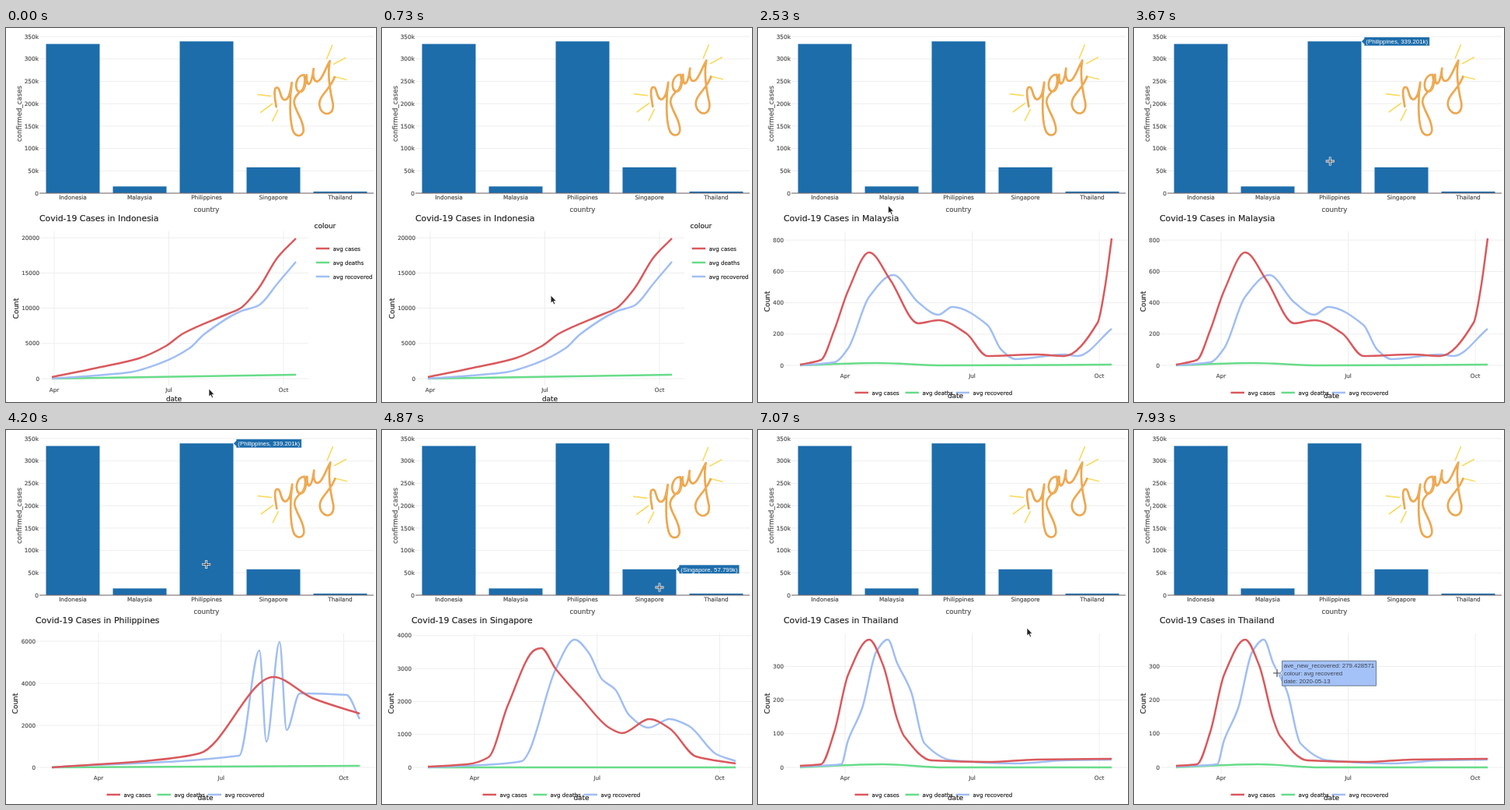
An HTML page that plays this animation: 476x480 px, repeating every 8000 ms.

```html
<!DOCTYPE html>
<html lang="en">
<head>
<meta charset="utf-8">
<title>Covid-19 dashboard</title>
<style>
  html, body { margin: 0; width: 100%; height: 100%; overflow: hidden; background: #fff; }
  svg { display: block; width: 100vw; height: 100vh; }
  text { font-family: "DejaVu Sans", sans-serif; stroke-width: .18px; white-space: pre; }
  .tip text { font-family: "Liberation Sans", Arial, sans-serif; stroke: none; }
  .grid { stroke: #eee; stroke-width: 1; }
  .line { fill: none; stroke-width: 2.5; stroke-linejoin: round; }
</style>
</head>
<body>
<svg id="stage" viewBox="0 0 476 480"></svg>
<script>
const LOOP = 8000;
const BLUE = '#1d6dab', GREY = '#4d4d4d', INK = '#222';
const COLORS = { cases: '#d9595d', deaths: '#68dc89', recovered: '#a1bef3' };
const stage = document.getElementById('stage');

function add(parent, tag, attrs = {}, text) {
  const node = document.createElementNS('http://www.w3.org/2000/svg', tag);
  for (const key in attrs) node.setAttribute(key, attrs[key]);
  if (text !== undefined) node.textContent = text;
  parent.appendChild(node);
  return node;
}
const label = (parent, text, x, y, size, anchor = 'start', fill = GREY) =>
  add(parent, 'text', { x, y, 'font-size': size, 'text-anchor': anchor, fill, stroke: fill }, text);
const upright = (parent, text, x, y, size, fill) =>
  label(parent, text, 0, 0, size, 'middle', fill).setAttribute('transform', `translate(${x} ${y}) rotate(-90)`);
const rule = (parent, x1, y1, x2, y2) => add(parent, 'line', { x1, y1, x2, y2, class: 'grid' });
const show = (node, on) => { node.style.display = on ? '' : 'none'; };

// Smooth path through a few "x,y" points that never overshoots them
function curve(points) {
  const p = points.split(' ').map(pair => pair.split(',').map(Number));
  const slope = p.slice(1).map(([x, y], i) => (y - p[i][1]) / (x - p[i][0]));
  const tangent = p.map((_, i) => {
    const a = slope[i - 1] ?? slope[i], b = slope[i] ?? a;
    return a * b > 0 ? 2 * a * b / (a + b) : 0;
  });
  return p.slice(1).reduce((d, [x, y], i) => {
    const [x0, y0] = p[i], h = (x - x0) / 3;
    return d + `C${x0 + h} ${y0 + h * tangent[i]} ${x - h} ${y - h * tangent[i + 1]} ${x} ${y}`;
  }, 'M' + p[0]);
}

// Bar chart
const HALF_BAR = 34.5, FLOOR = 212;
const barY = thousands => FLOOR - thousands * 0.5743;
const bars = Object.entries({
  Indonesia: 333.449, Malaysia: 15.096, Philippines: 339.201, Singapore: 57.799, Thailand: 3.636
}).map(([name, k], i) => ({ name, k, x: 86 + 86 * i, y: barY(k) }));

function drawBars() {
  for (let k = 0; k <= 350; k += 50) {
    rule(stage, 43, barY(k), 473, barY(k));
    label(stage, k ? k + 'k' : '0', 42, barY(k) + 2.7, 7.37, 'end');
  }
  for (const { name, x, y } of bars) {
    add(stage, 'rect', { x: x - HALF_BAR, y, width: 2 * HALF_BAR, height: FLOOR - y, fill: BLUE });
    label(stage, name, x, 220, 7.37, 'middle');
  }
  add(stage, 'line', { x1: 43, x2: 473, y1: FLOOR, y2: FLOOR, stroke: '#75666b' });
  label(stage, 'country', 258, 235.6, 8.6, 'middle');
  upright(stage, 'confirmed_cases', 20, 110, 8.6);
}

// Line charts: `unit` is the tick interval, `step` its height, `apr` and `gap` place the months
const wide = { right: 475, base: 433, bottom: 441 };
const short = { ...wide, left: 33, apr: 112, gap: 163.5 };
const long = { ...wide, left: 38, apr: 119, gap: 157.7 };
const charts = [
  { name: 'Indonesia', from: 0, side: true, left: 43, right: 389, base: 450, bottom: 458.5,
    apr: 62, gap: 147.5, unit: 5000, count: 4, step: 45.2,
    cases: '59,448 118,436 171,424 206,408 228,392 285,367 301,360 325,334 349,295 373,270',
    recovered: '59,450 158,442 199,430 236,411 255,393 301,364 325,356 350,327 373,300',
    deaths: '59,450 373,445' },
  { ...short, name: 'Malaysia', from: 2150, unit: 200, count: 4, step: 40.2,
    cases: '54,432 81,426 98,388 116,337 143,288 170,323 206,379 232,375 268,392 295,421 358,419 394,421 437,378 446,335 455,270',
    recovered: '54,433 98,429 116,411 143,345 174,317 206,352 232,368 250,358 295,381 313,413 331,425 394,419 411,421 455,386',
    deaths: '54,433 152,430 240,433 455,432' },
  { ...long, name: 'Philippines', from: 4000, unit: 2000, count: 3, step: 54,
    cases: '59,433 188,424 249,415 344,317 394,344 455,364',
    recovered: '59,433 300,418 326,283 335,400 352,272 361,385 378,338 438,340 455,371',
    deaths: '59,433 455,431' },
  { ...long, name: 'Singapore', from: 4720, unit: 1000, count: 4, step: 42.3,
    cases: '59,432 110,429 137,420 162,353 197,282 205,280 223,306 257,345 292,382 309,389 344,371 370,383 404,419 455,428',
    recovered: '59,433 145,429 180,425 188,415 223,308 248,269 266,286 283,320 300,333 318,366 343,382 370,371 395,380 430,416 455,425',
    deaths: '59,433 455,433' },
  { ...short, name: 'Thailand', from: 7000, unit: 100, count: 3, step: 43.2,
    cases: '54,431 81,429 98,388 116,314 143,269 161,302 179,371 188,393 223,424 295,426 358,423 455,422',
    recovered: '54,432 107,429 116,398 134,357 152,285 167,269 179,299 197,336 214,402 250,424 331,428 394,424 455,423',
    deaths: '54,433 160,429 240,433 455,433' }
];

function drawChart(c) {
  const g = add(stage, 'g');
  for (let i = 0; i <= c.count; i++) {
    const y = c.base - i * c.step;
    rule(g, c.left, y, c.right, y);
    label(g, i * c.unit, c.left, y + 2.6, 7.17, 'end');
  }
  ['Apr', 'Jul', 'Oct'].forEach((month, i) => {
    const x = c.apr + i * c.gap;
    rule(g, x, 261, x, c.bottom);
    label(g, month, x, c.bottom + 8, 7.17, 'middle');
  });
  for (const name of ['deaths', 'recovered', 'cases'])
    add(g, 'path', { d: curve(c[name]), class: 'line', stroke: COLORS[name] });
  Object.keys(COLORS).forEach((name, i) => {
    const x = c.side ? 398.7 : c.left + 91.5 + 65 * i;
    const y = c.side ? 283 + 18 * i : 468;
    add(g, 'line', { x1: x, x2: x + 17.5, y1: y, y2: y, class: 'line', stroke: COLORS[name] });
    label(g, 'avg ' + name, x + 22, y + 2.6, 7.1, 'start', INK);
  });
  label(g, 'Covid-19 Cases in ' + c.name, c.left, 248.4, 10.88, 'start', INK);
  if (c.side) label(g, 'colour', 396.5, 257.3, 8.97, 'start', INK);
  upright(g, 'Count', c.side ? 16 : 15, c.side ? 360 : 351, 8.97, INK);
  label(g, 'date', (c.left + c.right) / 2, c.side ? 479 : 474.5, 8.97, 'middle', INK);
  return g;
}

// Lettered sticker
function drawSticker() {
  const g = add(stage, 'g', { fill: 'none', 'stroke-linecap': 'round', 'stroke-linejoin': 'round' });
  add(g, 'path', { stroke: '#f8dc66', 'stroke-width': 1.7,
    d: 'M420 22L413 39M437 38L422 46M422 62L438 66M324 85L341 87M328 108L343 97M343 119L350 105' });
  const word = 'M348 101C347 94 344 81 347 77C354 72 352 92 359 92C365 91 366 80 368 70' +
    'C365 90 365 116 369 130C372 140 381 140 383 132C384 119 373 108 371 96C370 89 375 85 378 82' +
    'C370 79 373 60 384 60C386 69 384 79 378 82C384 82 386 73 387 60C387 78 393 75 396 52' +
    'C394 68 400 72 405 65C410 58 413 48 417 42C413 60 418 84 421 97C422 112 410 113 405 104' +
    'C400 93 408 86 414 78C418 73 421 68 423 63';
  add(g, 'path', { d: word, stroke: '#e59a3f', 'stroke-width': 2.6 });
  add(g, 'path', { d: word, stroke: '#f4b055', 'stroke-width': 1.2 });
  return g;
}

// Hover labels sit right of their anchor, or left (dir -1) where there is no room
function drawTip({ x, y, lines, dir = 1, fill = BLUE, ink = '#fff', edge = '#fff' }) {
  const g = add(stage, 'g', { class: 'tip' });
  const box = add(g, 'path', { fill, stroke: edge, 'stroke-width': 0.7 });
  const rows = lines.map((line, i) =>
    label(g, line, 0, y + 2.7 + (i - (lines.length - 1) / 2) * 10.3, 7.85, 'start', ink));
  const width = Math.max(...rows.map(row => row.getComputedTextLength())) + 4.6;
  const half = 0.7 + 5.1 * lines.length;
  const near = x + 3.5 * dir, far = near + width * dir;
  rows.forEach(row => row.setAttribute('x', Math.min(near, far) + 2.3));
  box.setAttribute('d', `M${x} ${y}L${near} ${y - 3.5}V${y - half}H${far}V${y + half}H${near}V${y + 3.5}Z`);
  return g;
}
function barTip({ name, k, x, y }) {
  const dir = x > 400 ? -1 : 1;
  return drawTip({ x: x + HALF_BAR * dir, y, dir, lines: [`(${name}, ${k}k)`] });
}

// Pointer stops: time, x, y
const stops = [
  [0, 261, 463], [1530, 167, 206], [2400, 168, 207], [2900, 165, 330], [3450, 252, 171], [4150, 253, 171],
  [4550, 357, 202], [5000, 357, 202], [5400, 342, 360], [5800, 410, 211], [6400, 411, 211],
  [7070, 346, 254], [7860, 184, 312], [LOOP, 184, 312]
];
function pointerAt(t) {
  const i = Math.max(1, stops.findIndex(stop => stop[0] > t));
  const [t0, x0, y0] = stops[i - 1], [t1, x1, y1] = stops[i];
  const u = (t - t0) / (t1 - t0), ease = u * u * (3 - 2 * u);
  const x = x0 + (x1 - x0) * ease, y = y0 + (y1 - y0) * ease;
  return { x, y, overPlot: t > 1600 && (y <= FLOOR || y > 262) };
}
function barAt(t) {
  const { x, y, overPlot } = pointerAt(Math.max(0, t));
  return overPlot ? bars.findIndex(bar => Math.abs(x - bar.x) < HALF_BAR && y > bar.y && y <= FLOOR) : -1;
}

drawBars();
const panels = charts.map(drawChart);
const sticker = drawSticker();
const barTips = bars.map(barTip);
const lineTip = drawTip({ x: 187, y: 312.3, fill: '#a4c2f7', ink: '#3c4250', edge: '#4a5468',
  lines: ['ave_new_recovered: 279.428571', 'colour: avg recovered', 'date: 2020-05-13'] });
const arrow = add(stage, 'path', { d: 'M0 0V10L2.3 8L4 11.7L5.6 11L4 7.4H7Z',
  fill: '#222', stroke: '#fff', 'stroke-width': 0.7 });
const cross = add(stage, 'g');
add(cross, 'path', { d: 'M-5.5 0H5.5M0 -5.5V5.5', stroke: '#fff', 'stroke-width': 2.8 });
add(cross, 'path', { d: 'M-5 0H5M0 -5V5', stroke: '#3b4248', 'stroke-width': 1.1 });

function render(t) {
  const active = charts.filter(c => c.from <= t).length - 1;
  panels.forEach((panel, i) => show(panel, i === active));
  // A bar's label appears once the pointer has rested on it briefly
  const hovered = barAt(t) === barAt(t - 90) ? barAt(t) : -1;
  barTips.forEach((tip, i) => show(tip, i === hovered));
  show(lineTip, t >= 7860);
  const { x, y, overPlot } = pointerAt(t);
  for (const shape of [arrow, cross]) shape.setAttribute('transform', `translate(${x} ${y})`);
  show(arrow, !overPlot);
  show(cross, overPlot);
  sticker.setAttribute('transform', t % 270 < 45 ? 'translate(-.3 .3)' : 'translate(.3 -.3)');
}
const start = performance.now();
function tick() {
  render((performance.now() - start) % LOOP);
  requestAnimationFrame(tick);
}
tick();
</script>
</body>
</html>
```
